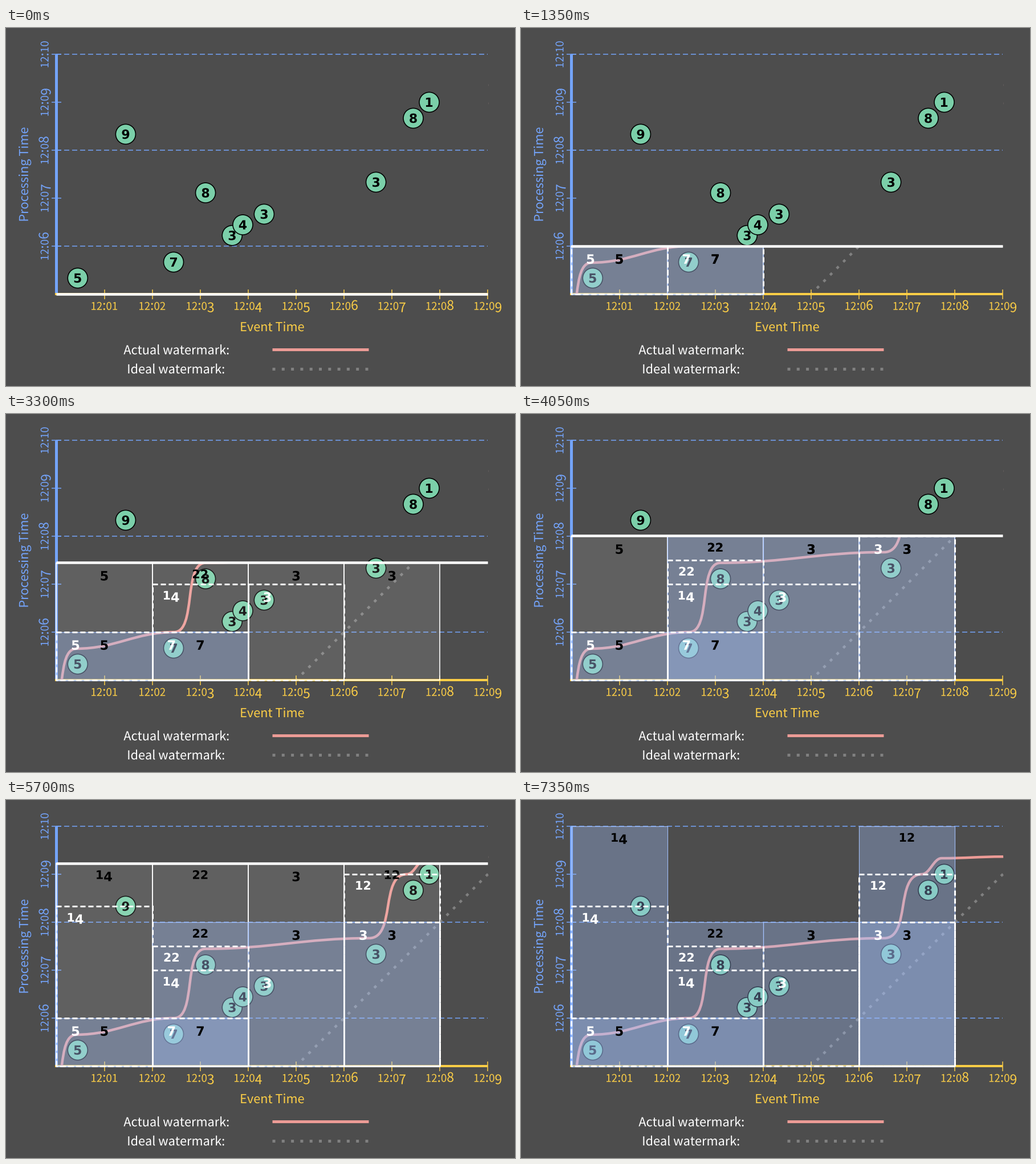
A matplotlib script that plays this animation: 893 by 627 pixels, repeating every 8 s.

```python
import math

import matplotlib.pyplot as plt
from matplotlib.animation import FuncAnimation
from matplotlib.patches import Circle, PathPatch, Polygon, Rectangle
from matplotlib.path import Path
from matplotlib.textpath import TextPath
from matplotlib.transforms import Affine2D

W, H, DPI = 893, 627, 64
PT = 72 / DPI                      # points per pixel
LEFT, BASE = 88.4, 466
UNIT = 9.345                       # pixels per ninth of a minute, across
RISE = 84 / 9                      # and upwards; the clock climbs one per step
MINUTE, WINDOW = 9, 18             # lengths in ninths of a minute
END, LAST = 45, 49                 # step at 12:10, step when the clock line is gone

BG, BLUE, YELLOW = "#4d4d4d", "#74a4fb", "#fcce46"
GREEN, PINK, GREY = "#7bcfa9", "#ec9b96", "#808080"
PANE = (165 / 255, 195 / 255, 1)
PLAIN = dict(family="Noto Sans CJK JP")
BOLD = dict(family="DejaVu Sans", weight="bold")

# (event time, arrival step, value)
EVENTS = [(4, 3, 5), (22, 6, 7), (33, 11, 3), (35, 13, 4), (39, 15, 3),
          (28, 19, 8), (60, 21, 3), (13, 30, 9), (67, 33, 8), (70, 36, 1)]
# level spots of the actual watermark: (event time, step)
KNOTS = [(-1.8, -5.9), (3.8, 5.9), (22.1, 9), (28, 22),
         (58.7, 24), (65.8, 36), (69.5, 39), (81.1, 39.3)]
# step at which the watermark passes the end of each window
PASSED = [9, 22.5, 24, 42]

fig = plt.figure(figsize=(W / DPI, H / DPI), dpi=DPI, facecolor=BG)
ax = fig.add_axes([0, 0, 1, 1])
ax.set_xlim(0, W)
ax.set_ylim(H, 0)
ax.axis("off")


def px(t):
    return LEFT + UNIT * t


def py(step):
    return BASE - RISE * step


def total(w, step):
    return sum(v for t, s, v in EVENTS if t // WINDOW == w and s <= step)


def firing(t, s):
    """Late events fire at once, others on the next minute or on time."""
    on_time = PASSED[t // WINDOW]
    return s if s >= on_time else min(math.ceil(s / MINUTE) * MINUTE, on_time)


def closing(s):
    """Windows with news close at 12:06, 12:08 and 12:10."""
    return math.ceil((s - MINUTE) / WINDOW) * WINDOW + MINUTE


def advance(ch, size, font):
    pair = TextPath((0, 0), ch + "|", size=size, prop=font).get_extents().x1
    return pair - TextPath((0, 0), "|", size=size, prop=font).get_extents().x1


def numerals(s, size, font, small):
    """Old-style figures: 0, 1, 2 are small and 3, 4, 5, 7, 9 hang below."""
    parts, pen = [], 0
    for ch in s:
        em = size * (small if ch in "012" else 1)
        drop = -0.17 * size if ch in "34579" else 0
        parts.append(TextPath((pen, drop), ch, size=em, prop=font))
        pen += advance(ch, em, font)
    return Path.make_compound_path(*parts)


def place(path, x, y, turn=0, middle=False):
    box = path.get_extents()
    dy = (box.y0 + box.y1) / 2 if middle else 0
    move = Affine2D().translate(-(box.x0 + box.x1) / 2, -dy).scale(1, -1)
    return move.rotate_deg(turn).translate(x, y).transform_path(path)


def ink(path, color, z):
    return ax.add_patch(PathPatch(path, fc=color, lw=0, zorder=z))


def words(s, x, y, color, turn=0):
    ink(place(TextPath((0, 0), s, size=21.7, prop=PLAIN), x, y, turn), color, 2)


def tick(minute, x, y, color, turn=0):
    text = numerals(f"12:{minute:02d}", 23, PLAIN, 0.81)
    ink(place(text, x, y, turn), color, 2)


def sum_path(value, t, y):
    return place(numerals(str(value), 22.5, BOLD, 0.92), px(t), y + 27)


def line(xs, ys, color, width, z, dash=None):
    """A line; dash is (on, off, start) in pixels."""
    style = "-"
    if dash:
        on, off, start = dash
        style = (start / width, (on / width, off / width))
    return ax.plot(xs, ys, color=color, lw=width * PT, zorder=z, ls=style,
                   solid_capstyle="butt", dash_capstyle="butt")[0]


# axes, grid and legend
right = px(9 * MINUTE)
line([LEFT, LEFT], [py(45), BASE], BLUE, 5, 2)
line([LEFT - 2, right], [BASE + 0.4] * 2, YELLOW, 4, 2.1)
for m in range(6, 11):
    y = py((m - 5) * MINUTE)
    line([80, 97], [y, y], BLUE, 1.5, 2)
    tick(m, 74.5, y, BLUE, -90)
    if m % 2 == 0:
        line([LEFT, right], [y, y], BLUE, 1.5, 1, (9, 5, 0))
for m in range(1, 10):
    x = px(m * MINUTE)
    line([x, x], [458, 475], YELLOW, 1.5, 2.1)
    tick(m, x, 493.7, YELLOW)
words("Processing Time", 38.8, 256, BLUE, -90)
words("Event Time", 467.5, 531, YELLOW)
words("Actual watermark:", 298.5, 571.5, "white")
words("Ideal watermark:", 298.5, 605, "white")
line([467, 635.5], [563, 563], PINK, 5, 2)
line([467, 635.5], [597, 597], GREY, 5, 2, (5, 11.3, 0))
for y in (99, 131):
    line([846, 846], [y - 1.5, y + 1.5], "#625c5c", 1, 2)

# events
for t, step, value in EVENTS:
    x, y, z = px(t), py(step), 3 + step / 100
    ax.add_patch(Circle((x, y), 17.5, fc=GREEN, ec="black", lw=1.6 * PT, zorder=z))
    digit = TextPath((0, 0), str(value), size=22, prop=BOLD)
    ink(place(digit, x, y, middle=True), "black", z + 0.004)

# watermarks, uncovered by the clock line
points = [(px(t), py(s)) for t, s in KNOTS]
curve = points[:1]
for (x0, y0), (x1, y1) in zip(points, points[1:]):
    pull = (x1 - x0) * (0.72 if y0 - y1 > x1 - x0 else 0.4)
    curve += [(x0 + pull, y0), (x1 - pull, y1), (x1, y1)]
codes = [Path.MOVETO] + [Path.CURVE4] * (len(curve) - 1)
actual = ax.add_patch(PathPatch(Path(curve, codes), fc="none", ec=PINK, lw=4.5 * PT,
                                capstyle="butt", zorder=2.8))
ideal = line([px(45), px(81) + 1], [BASE, py(36) - 1], GREY, 4.5, 1.5, (5, 11.3, 1.8))

# growing windows, with a running sum
live = []
for w in range(4):
    rect = Rectangle((px(w * WINDOW), BASE), UNIT * WINDOW, 0, lw=1.6 * PT, zorder=5)
    live.append((w, ax.add_patch(rect), ink(sum_path(0, 0, 0), "black", 8)))

# closed panes and dashed firings, each switched on at its step
timed = []
for step, w in sorted({(closing(s), t // WINDOW) for t, s, v in EVENTS}):
    y = py(step)
    rect = Rectangle((px(w * WINDOW), y), UNIT * WINDOW, BASE + 1 - y,
                     fc=PANE + (0.33,), ec=PANE + (0.9,), lw=1.2 * PT, zorder=6)
    label = sum_path(total(w, step), (w + 0.5) * WINDOW, y)
    timed.append((step, [ax.add_patch(rect), ink(label, "black", 8)]))
for step, w in sorted({(firing(t, s), t // WINDOW) for t, s, v in EVENTS}):
    y = py(step)
    sides = [px(w * WINDOW), px((w + 1) * WINDOW)]
    if w % 2 and step % WINDOW == MINUTE:
        sides.reverse()            # dashes run the other way round
    xa, xb = sides
    frame = Polygon([(xa, BASE), (xa, y), (xb, y), (xb, BASE)], fc="none", ec="white",
                    lw=3 * PT, ls=(0, (3, 5 / 3)), capstyle="butt", zorder=9)
    label = sum_path(total(w, step), (w + 0.2) * WINDOW, y)
    timed.append((step, [ax.add_patch(frame), ink(label, "white", 10)]))

clock = line([LEFT, right], [BASE, BASE], "white", 4.5, 11)


def update(i):
    step = min(i * 50 // 150, LAST)
    y = py(min(step, END))
    fade = min(1, (LAST - step) / (LAST - END))
    clock.set_ydata([y - 0.5, y - 0.5])
    clock.set_alpha(fade)

    seen = Rectangle((0, BASE), 846, y - BASE - 0.01, transform=ax.transData)
    actual.set_clip_path(seen)
    ideal.set_clip_path(seen)

    for w, rect, label in live:
        value = total(w, step)
        on = value > 0 and fade > 0
        rect.set_visible(on)
        label.set_visible(on)
        if on:
            rect.set_height(y - BASE)
            rect.set_facecolor((1, 1, 1, 0.11 * fade))
            rect.set_edgecolor((1, 1, 1, fade))
            label.set_path(sum_path(value, (w + 0.5) * WINDOW, y))
            label.set_alpha(fade)

    for start, artists in timed:
        for artist in artists:
            artist.set_visible(step >= start)
    return []


anim = FuncAnimation(fig, update, frames=160, interval=50, repeat=True,
                     repeat_delay=0, init_func=lambda: update(0), blit=False)
plt.show()
```
